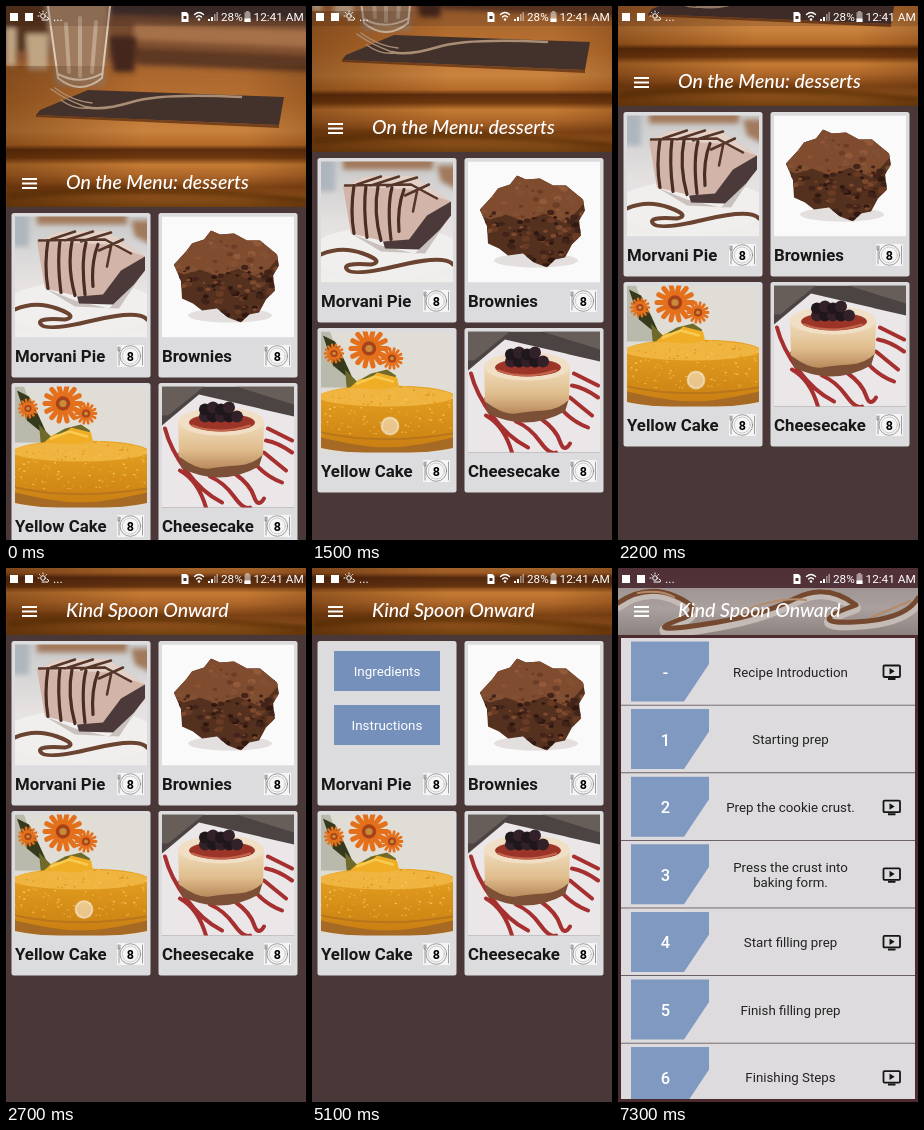
Recreate the animation shown at these times as an HTML page. Size 300 by 534 pixels, loop 8 s.

```html
<!DOCTYPE html>
<html lang="en">
<head>
<meta charset="utf-8">
<title>Dessert recipes</title>
<style>
html, body { margin: 0; width: 100%; height: 100%; overflow: hidden; background: #4a3838; }
svg { display: block; }
text { font-family: Roboto, sans-serif; }
.title { font: italic 500 19.5px Lato, sans-serif; fill: #fff; }
.label { font-weight: 700; font-size: 16.8px; fill: #171717; }
.mid { text-anchor: middle; }
.step { font-size: 13.3px; fill: #222; }
.line { fill: none; stroke-linecap: round; stroke-linejoin: round; }
</style>
</head>
<body>
<svg id="stage" width="300" height="534" viewBox="0 0 300 534">
  <defs>
    <linearGradient id="wood" x2="0" y2="1">
      <stop offset="0" stop-color="#68452f"/>
      <stop offset=".25" stop-color="#855230"/>
      <stop offset=".32" stop-color="#a9672f"/>
      <stop offset=".48" stop-color="#b9702f"/>
      <stop offset=".62" stop-color="#c9833f"/>
      <stop offset=".69" stop-color="#b56a28"/>
      <stop offset=".715" stop-color="#5b2d0e"/>
      <stop offset=".755" stop-color="#70390f"/>
      <stop offset=".79" stop-color="#c57b34"/>
      <stop offset=".84" stop-color="#b0682a"/>
      <stop offset=".9" stop-color="#804516"/>
      <stop offset=".94" stop-color="#95561f"/>
      <stop offset="1" stop-color="#70400f"/>
    </linearGradient>
    <linearGradient id="shade">
      <stop offset="0" stop-color="#3c1800" stop-opacity=".35"/>
      <stop offset=".45" stop-color="#3c1800" stop-opacity="0"/>
      <stop offset=".8" stop-color="#3c1800" stop-opacity="0"/>
      <stop offset="1" stop-color="#3c1800" stop-opacity=".2"/>
    </linearGradient>
    <linearGradient id="plate" x2="0" y2="1">
      <stop offset="0" stop-color="#c9cacb"/>
      <stop offset=".5" stop-color="#e3e0df"/>
      <stop offset="1" stop-color="#f1efee"/>
    </linearGradient>
    <linearGradient id="sponge" x2="0" y2="1">
      <stop offset="0" stop-color="#f0b136"/>
      <stop offset=".5" stop-color="#e5a01f"/>
      <stop offset="1" stop-color="#c77d12"/>
    </linearGradient>
    <linearGradient id="curd" x2="0" y2="1">
      <stop offset="0" stop-color="#f0dec0"/>
      <stop offset=".6" stop-color="#e0bd8d"/>
      <stop offset="1" stop-color="#b98a5c"/>
    </linearGradient>
    <linearGradient id="cream" x2="0" y2="1">
      <stop offset="0" stop-color="#948987"/>
      <stop offset=".6" stop-color="#aaa09e"/>
      <stop offset="1" stop-color="#8c8280"/>
    </linearGradient>
    <filter id="soft"><feGaussianBlur stdDeviation="2.5"/></filter>
    <filter id="fine"><feGaussianBlur stdDeviation=".5"/></filter>
    <clipPath id="brownieShape"><path d="M12 48L24 35L30 27L42 23L49 14L58 18L72 17L85 24L98 24L115 38L117 49L111 59L113 74L104 83L97 96L87 98L79 106L66 101L55 92L40 94L31 87L20 82L19 65Z"/></clipPath>
    <clipPath id="spongeShape"><path d="M-4 66Q8 54 66 54T136 65V105Q90 116 66 116T-4 105Z"/></clipPath>
  </defs>

  <g id="menu">
    <rect width="300" height="534" fill="#4a3838"/>
    <g id="scroll">
      <g id="hero" transform="translate(0 -134)">
        <rect width="300" height="201" fill="url(#wood)"/>
        <g filter="url(#soft)">
          <path d="M-9 -9H46V45H-9Z" fill="#54301c"/>
          <path d="M100 -9H310V14L100 8Z" fill="#3d2f2b"/>
          <path d="M128 18L310 24V42L128 34Z" fill="#a67148"/>
          <path d="M130 42L310 50V66L130 58Z" fill="#5d3722"/>
          <path d="M0 22H10V60H0ZM20 28H42V64H22Z" fill="#c0a583"/>
          <path d="M38 -9H104L98 80H50Z" fill="#9f7b5e"/>
          <path d="M102 30H131L128 66H108Z" fill="#45261b"/>
          <path d="M0 186Q150 172 300 192V197Q150 182 0 194Z" fill="#4e280b" opacity=".6"/>
        </g>
        <g class="line" stroke="#ddcbb6" filter="url(#fine)">
          <path d="M42 0L52 72Q74 90 96 72L104 0M52 68Q74 80 97 67" stroke-width="2"/>
          <path d="M60 18L63 66M74 12V70M90 16L86 66" stroke-width="4" opacity=".5"/>
        </g>
        <rect y="60" width="300" height="141" fill="url(#shade)"/>
        <path d="M82 84L278 91L273 119L30 109L34 104Z" fill="#43312b"/>
        <path d="M30 109L273 119V122L30 111Z" fill="#55290f" opacity=".7"/>
        <g class="line" stroke="#a98d75">
          <path d="M80 101Q96 105 126 96T235 91" stroke-width="2.5"/>
          <path d="M45 83Q58 93 80 101M49 82Q66 95 86 97M55 94Q68 104 84 102" stroke-width="1.5"/>
        </g>
      </g>
      <g id="cards"></g>
      <text id="menuTitle" class="title" x="60" y="49">On the Menu: desserts</text>
      <text id="appTitle" class="title" x="60" y="49">Kind Spoon Onward</text>
      <path d="M16 39h15M16 43.5h15M16 48h15" stroke="#fff" stroke-width="2"/>
    </g>
    <circle id="touch" cx="78" r="8.5" fill="#fff" fill-opacity=".5" stroke="#fff" stroke-opacity=".45" stroke-width="2"/>
  </g>

  <g id="recipe">
    <rect width="300" height="534" fill="#4b2b30"/>
    <rect width="300" height="67" fill="url(#cream)"/>
    <svg width="300" height="67">
      <g class="line" filter="url(#fine)">
        <path d="M0 38Q28 18 57 31T66 52Q20 70 82 61T176 34T238 40Q185 59 236 57T300 34" stroke="#c4bab6" stroke-width="10"/>
        <path d="M0 35Q28 16 57 28T66 50Q20 66 82 57T176 31T238 37Q185 56 236 54T300 30" stroke="#74492f" stroke-width="5"/>
        <path d="M20 25Q42 21 56 29M120 45Q160 28 188 32M254 49L292 33" stroke="#b48a6a" stroke-width="2"/>
      </g>
    </svg>
    <rect width="300" height="20" fill="#4e2830" opacity=".85"/>
    <path d="M16 39h15M16 43.5h15M16 48h15" stroke="#fff" stroke-width="2"/>
    <text class="title" x="60" y="49">Kind Spoon Onward</text>
    <svg id="steps" x="3" y="70" width="294" height="461" viewBox="3 70 294 461"></svg>
  </g>

  <g id="status" fill="#fff">
    <rect width="300" height="20" fill="#241014" opacity=".15"/>
    <rect x="4" y="7" width="8" height="8"/>
    <rect x="19" y="7" width="8" height="8"/>
    <g class="line" stroke="#fff">
      <circle cx="37" cy="10" r="2.3"/>
      <path d="M37 5V6M32 10h1M33.5 6.5l.7.7M40.5 6.5l-.7.7M36 14h6q2-2-1-3"/>
      <path d="M188.5 8.5Q193 4.5 197.5 8.5M190.5 11Q193 8.5 195.5 11" stroke-width="1.4"/>
    </g>
    <text x="47" y="14.5" font-size="12.5">...</text>
    <path d="M175.5 6h5l2 2v8h-7Z"/>
    <path d="M177.5 10h3v3h-3Z" fill="#4b3427"/>
    <circle cx="193" cy="13.5" r="1.3"/>
    <path d="M202 13h2v2h-2ZM205 11h2v4h-2Z"/>
    <path d="M208 8h1.6v7H208ZM210.4 6H212v9h-1.6Z" opacity=".45"/>
    <text x="215" y="14.5" font-size="11.7">28%</text>
    <path d="M240 5h3v1.2h1.5V16h-6V6.2h1.5Z" opacity=".5"/>
    <path d="M238.5 12.5h6V16h-6Z"/>
    <text x="247.5" y="14.5" font-size="11.8">12:41 AM</text>
  </g>
</svg>

<script>
const $ = id => document.getElementById(id);
const range = n => [...Array(n).keys()];

let seed = 7;
const rand = () => (seed = seed * 16807 % 2147483647) / 2147483647;

const path = (d, fill) => `<path d="${d}" fill="${fill}"/>`;
const line = (d, color, width) =>
  `<path class="line" d="${d}" stroke="${color}" stroke-width="${width}"/>`;
const disc = (x, y, rx, ry, fill) =>
  `<ellipse cx="${x}" cy="${y}" rx="${rx}" ry="${ry}" fill="${fill}"/>`;
const backdrop = fill => `<rect width="132" height="121" fill="${fill}"/>`;

// Random grains of the given colours inside a clip shape.
function grains(clip, count, size, top, bottom, colors) {
  const dots = range(count).map(() => {
    const x = rand() * 132, y = top + rand() * (bottom - top), r = size * (.4 + rand());
    return disc(x, y, r, r * .7, colors[Math.floor(rand() * colors.length)]);
  });
  return `<g clip-path="url(#${clip})">${dots.join('')}</g>`;
}

function flower(x, y, r) {
  const petals = range(14).map(i => {
    const a = i * Math.PI / 7;
    return `M${x} ${y}L${x + r * Math.cos(a)} ${y + r * Math.sin(a)}`;
  }).join('');
  return line(petals, '#e4701c', r / 3.6) + disc(x, y, r * .4, r * .4, '#a8421a') +
    disc(x, y, r * .2, r * .2, '#c98a3a');
}

const pie = backdrop('url(#plate)') +
  `<g filter="url(#soft)">${path('M22 -4H112V8H22ZM116 4H140V30L120 20Z', '#a1795c') + path('M-4 -4H14V30H-4Z', '#aeb6bd')}</g>` +
  disc(66, 91, 78, 26, '#f1efee') +
  path('M30 72L60 84L94 92L124 62L104 92L60 90Z', '#c9c1be') +
  path('M22 25L44 15L92 14L130 40L122 56L92 82L60 79L30 72Z', '#d2b5a8') +
  path('M22 25L44 15L92 14L130 40L94 28Z', '#e3d0c7') +
  path('M130 40L130 54L119 68L98 88L64 87L62 80L88 78L106 54Z', '#4b3a39') +
  line('M33 24Q29 50 33 72M45 24Q42 46 46 76M57 25Q52 50 60 79M71 26Q66 45 70 78M83 28Q76 46 78 70', '#4a2d24', 3.2) +
  line('M24 24L90 23L116 37M96 16L66 25M108 23L84 34M60 15L36 23M78 15L50 24M96 30L92 50', '#553628', 2.5) +
  line('M0 93Q20 84 42 92T50 103Q20 101 26 108T78 104T132 103', '#6b4431', 4);

const brownie = backdrop('#fafafa') +
  disc(68, 99, 42, 7, '#e2dfde') +
  `<g clip-path="url(#brownieShape)">
    ${backdrop('#54301f')}
    ${path('M0 49L48 0L132 30L114 44L98 62L76 52L56 60L38 53L22 58Z', '#7f4c2f')}
  </g>` +
  grains('brownieShape', 170, 3, 50, 106, ['#30180f', '#7d4a2e', '#422319', '#693b24']) +
  grains('brownieShape', 60, 3, 14, 54, ['#92593a', '#6c3d26', '#825033']);

const cake = backdrop('#dfddd5') +
  path('M0 0H9L24 44L30 56H0Z', '#b9b9ac') +
  path('M2 4L14 10L24 30L34 52L12 34Z', '#353a1d') +
  path('M24 38L36 50L50 42L66 38L75 44L72 60H26Z', '#6f6a29') +
  flower(13, 22, 9) + flower(71, 27, 10) + flower(48, 17, 18) +
  disc(66, 110, 78, 12, '#a66a24') +
  `<g clip-path="url(#spongeShape)">${backdrop('url(#sponge)')}</g>` +
  disc(65, 65, 68, 10, '#f0b440') +
  grains('spongeShape', 220, .9, 54, 104, ['#f6c85e', '#d8921a', '#edb035']) +
  path('M29 56L38 48L50 47L56 41L76 46L78 55L60 58Z', '#efae25') +
  line('M36 52L54 45L72 50', '#f8cb50', 2.5) +
  line('M0 101Q60 114 132 102', '#b9751b', 2);

const cheesecake = backdrop('#4b4443') +
  path('M0 0H42L6 29H0ZM74 0H132V18Z', '#675d59') +
  path('M37 8L132 30V121H0V39Z', '#ebe7e8') +
  line('M3 42Q8 62 24 84T60 116M18 84Q36 94 44 121M48 90Q62 96 72 110T88 121M74 88Q88 98 92 110T102 112M94 78Q104 90 120 96M102 66Q114 76 124 84M104 54Q116 56 130 66M106 42L130 54', '#a63030', 4) +
  path('M16 66Q58 90 102 64L97 80Q59 101 20 82Z', '#7c5036') +
  path('M16 34H102L101 68Q92 78 76 79T48 82T17 70Z', 'url(#curd)') +
  disc(59, 35, 43, 14, '#f1dfc5') +
  disc(60, 36, 33, 9, '#9c3527') +
  line('M30 39Q56 49 88 39', '#c4664d', 2) +
  range(9).map(i => disc(43 + i % 5 * 8, i < 5 ? 30 : 21 + i % 2 * 2, 6, 6, i % 2 ? '#1f171b' : '#33212a')).join('');

const desserts = [
  ['Morvani Pie', pie], ['Brownies', brownie],
  ['Yellow Cake', cake], ['Cheesecake', cheesecake]
];

const button = (y, label) =>
  `<rect x="22" y="${y}" width="106" height="40" fill="#7590bb"/>
   <text class="mid" x="75" y="${y + 25}" font-size="13.4" fill="#fff">${label}</text>`;

const servings = `<rect x="111" y="205" width="27" height="22" fill="#f5f5f5"/>
  <g class="line" stroke="#777" stroke-width=".7">
    <circle cx="124.3" cy="216" r="10.3"/><circle cx="124.3" cy="216" r="8" stroke="#bbb"/>
    <path d="M113 207v18M112 207v4h2v-4M136.5 207v18"/>
  </g>
  <text class="mid" x="124.3" y="220.5" font-size="12.5" font-weight="700">8</text>`;

$('cards').innerHTML = desserts.map(([name, photo], i) =>
  `<g transform="translate(${i % 2 * 147} ${i > 1 ? 170 : 0})">
    <rect x="5.5" y="73" width="139" height="164.5" rx="2.5" fill="#dcdbdd"/>
    <svg id="photo${i}" x="9" y="76.5" width="132" height="121">${photo}</svg>
    ${i ? '' : `<g id="buttons">${button(83, 'Ingredients')}${button(137, 'Instructions')}</g>`}
    <text class="label" x="9" y="222">${name}</text>${servings}
  </g>`).join('');

const steps = ['Recipe Introduction', 'Starting prep', 'Prep the cookie crust.',
  'Press the crust into|baking form.', 'Start filling prep', 'Finish filling prep', 'Finishing Steps'];
const video = `<rect x="265.5" y="27.5" width="16.5" height="11.5" rx="1" fill="none" stroke="#161616" stroke-width="1.8"/>
  <path d="M271.5 30v6.5l5.2-3.25ZM270 40h7.5v2H270Z" fill="#161616"/>`;

$('steps').innerHTML = steps.map((step, i) => {
  const lines = step.split('|');
  const texts = lines.map((s, k) =>
    `<text class="mid step" x="172.5" y="${38.5 + (k - (lines.length - 1) / 2) * 15.5}">${s}</text>`).join('');
  return `<g transform="translate(0 ${70 + i * 67.6})">
    <rect x="3" width="294" height="67.6" fill="#dddbdd"/>
    <path d="M3 67.3H297" stroke="#51444a" stroke-width="1"/>
    <path d="M13 3.5H91V26L66 63.5H13Z" fill="#8099c0"/>
    <text class="mid" x="47.5" y="40" font-size="16.5" font-weight="500" fill="#fff">${i || '-'}</text>
    ${texts}${i === 1 || i === 5 ? '' : video}
  </g>`;
}).join('');

const clamp = x => Math.max(0, Math.min(1, x));

// Piecewise linear value from [time, value] points.
function track(points, t) {
  let value = points[0][1];
  for (let i = 1; i < points.length; i++) {
    const [t0, v0] = points[i - 1], [t1, v1] = points[i];
    if (t >= t0) value = v0 + (v1 - v0) * clamp((t - t0) / (t1 - t0));
  }
  return value;
}

const scrollPath = [[700, 134], [1100, 117], [1500, 79], [1600, 72], [2200, 33], [2500, 11], [2700, 0]];
const touchPath = [[700, 471], [1100, 454], [1500, 420], [2200, 374], [2500, 352], [3400, 305]];
const show = (id, opacity) => $(id).setAttribute('opacity', opacity);

function draw(now) {
  const t = Math.floor(now % 8000 / 100) * 100;
  const offset = track(scrollPath, t);
  $('scroll').setAttribute('transform', `translate(0 ${offset})`);
  show('menuTitle', +(offset > 0));
  show('appTitle', +(offset === 0));

  $('touch').setAttribute('cy', track(touchPath, t));
  show('touch', +(t >= 800 && t < 3500));

  const flip = clamp((t - 4700) / 400);
  show('photo0', 1 - flip);
  show('buttons', flip);

  const open = clamp((t - 6700) / 400);
  show('recipe', open);
  $('recipe').setAttribute('transform', `translate(0 ${40 * (1 - open) ** 2})`);
  requestAnimationFrame(draw);
}
requestAnimationFrame(draw);
</script>
</body>
</html>
```
